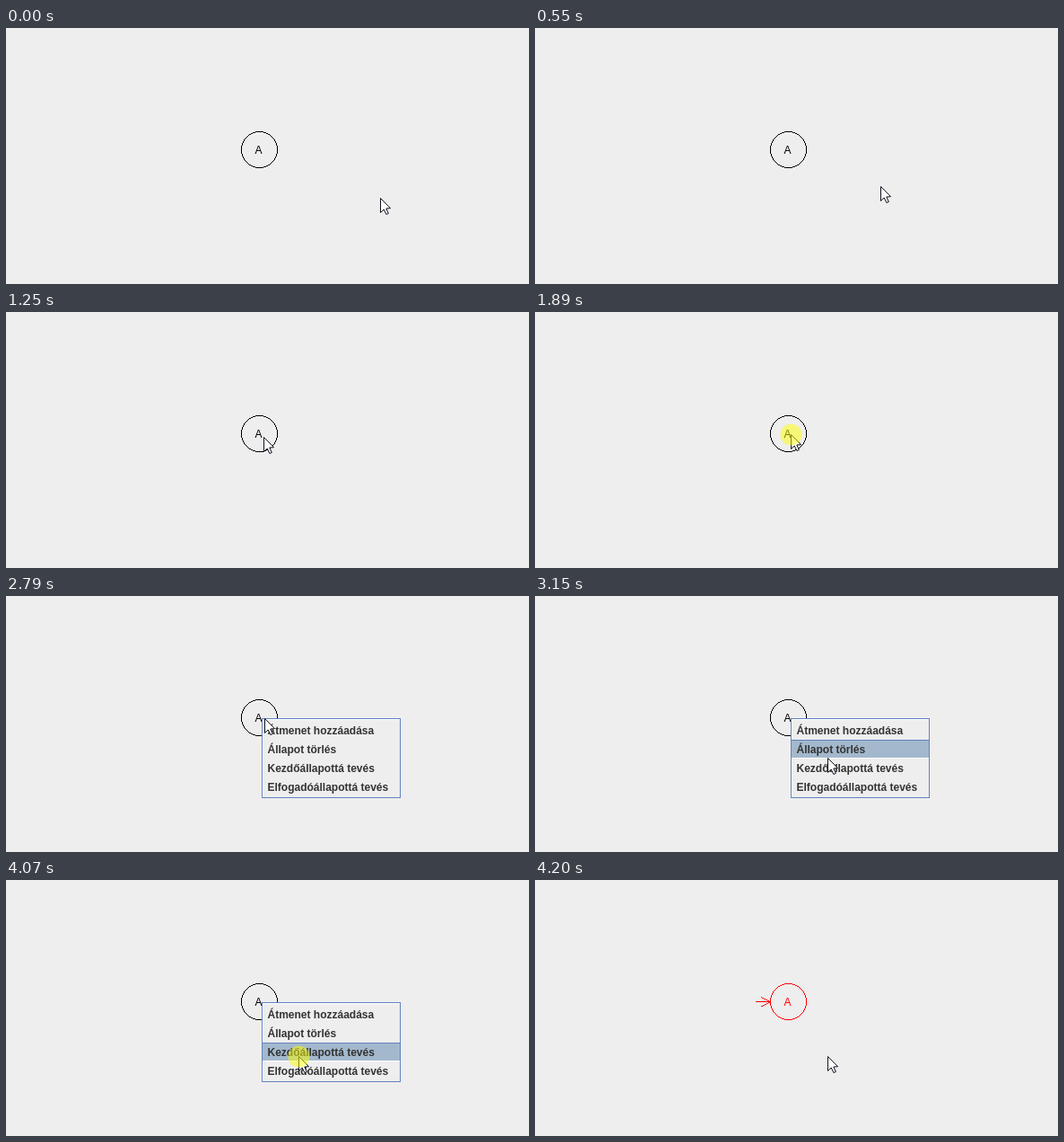
Animation of 583x285 px, one loop 4.9 s. Source, as an HTML page with a canvas:

```html
<!DOCTYPE html>
<html lang="hu">
<head>
<meta charset="utf-8">
<title>Kezdőállapot beállítása</title>
<style>
html, body { margin: 0; width: 100%; height: 100%; overflow: hidden; background: #eee; }
canvas { display: block; }
</style>
</head>
<body>
<canvas id="stage" width="583" height="285"></canvas>
<script>
const ctx = document.getElementById('stage').getContext('2d');
const LOOP = 4900;
const FACE = '"Liberation Sans", Arial, sans-serif';
const MENU = { x: 285, y: 136, w: 155, h: 89, row: 21 };
const ITEMS = ['Átmenet hozzáadása', 'Állapot törlés', 'Kezdőállapottá tevés', 'Elfogadóállapottá tevés'];
const START = [417, 189];

// Pointer moves: start, end, number of steps, waypoints as [step, x, y]
const MOVES = [
  { from: 450, to: 970, steps: 12, path: [[0, 413, 187], [2, 385, 176], [4, 345, 164], [6, 308, 156], [8, 290, 153], [11, 288, 143]] },
  { from: 1050, to: 1380, steps: 7, path: [[0, 288, 142], [6, 285, 136]] },
  { from: 2790, to: 3280, steps: 12, path: [[0, 288, 136], [4, 306, 152], [8, 326, 180], [11, 331, 193]] },
  { from: 3330, to: 3331, steps: 2, path: [[0, 331, 195], [1, 331, 195]] },
  { from: 3560, to: 3890, steps: 5, path: [[0, 331, 196], [4, 326, 196]] }
];

const within = (t, a, b) => t >= a && t < b;

function rect(x, y, w, h, color) {
  ctx.fillStyle = color;
  ctx.fillRect(x, y, w, h);
}

function text(str, x, y, color, weight = '') {
  ctx.font = `${weight} 12px ${FACE}`;
  ctx.fillStyle = color;
  ctx.fillText(str, x, y);
}

// Crisp one-pixel circle and line, without smoothing
function circle(cx, cy, r, color) {
  const n = Math.round(r * Math.SQRT1_2);
  for (let i = -n; i <= n; i++) {
    const j = Math.round(Math.sqrt(r * r - i * i));
    for (const s of [-j, j]) {
      rect(cx + i, cy + s, 1, 1, color);
      rect(cx + s, cy + i, 1, 1, color);
    }
  }
}

function line(x0, y0, x1, y1, color) {
  const n = Math.max(Math.abs(x1 - x0), Math.abs(y1 - y0));
  for (let i = 0; i <= n; i++) {
    rect(Math.round(x0 + (x1 - x0) * i / n), Math.round(y0 + (y1 - y0) * i / n), 1, 1, color);
  }
}

function along(path, k) {
  let i = 0;
  while (i < path.length - 2 && k > path[i + 1][0]) i++;
  const [k0, x0, y0] = path[i];
  const [k1, x1, y1] = path[i + 1];
  const p = (k - k0) / (k1 - k0);
  return [Math.round(x0 + (x1 - x0) * p), Math.round(y0 + (y1 - y0) * p)];
}

function pointerAt(t) {
  const move = MOVES.filter(m => t >= m.from).pop();
  if (!move) return START;
  const last = move.steps - 1;
  const k = Math.min(last, Math.floor((t - move.from) / (move.to - move.from) * last + 0.001));
  return along(move.path, k);
}

function drawState(active) {
  const color = active ? '#f00' : '#000';
  circle(282, 135, 20, color);
  text('A', 277.5, 139.5, color);
  if (active) {
    line(246, 135, 262, 135, color);
    line(252, 130, 262, 135, color);
    line(252, 140, 262, 135, color);
  }
}

function drawMenu(py) {
  const { x, y, w, h, row } = MENU;
  rect(x, y, w, h, '#6382bf');
  rect(x + 1, y + 1, w - 2, h - 2, '#eee');
  rect(x + 1, y + 1, w - 2, 1, '#fff');
  rect(x + 1, y + 1, 1, h - 2, '#fff');
  const hover = Math.floor((py - y - 3) / row);
  ITEMS.forEach((label, i) => {
    const top = y + 3 + i * row;
    if (i === hover) {
      rect(x + 1, top, w - 2, row, '#a3b8cc');
      rect(x + 1, top, w - 2, 1, '#6382bf');
      rect(x + 1, top + row - 1, w - 2, 1, '#fff');
    }
    text(label, 291.5, top + 15, '#333', 'bold');
  });
}

function drawPointer(x, y) {
  ctx.save();
  ctx.translate(x + 0.5, y + 0.5);
  ctx.beginPath();
  ctx.moveTo(0, 0);
  for (const [px, py] of [[0, 16], [3.7, 12.5], [6.4, 18], [8.8, 17], [6.3, 11.5], [11, 11.2]]) ctx.lineTo(px, py);
  ctx.closePath();
  ctx.fillStyle = '#fff';
  ctx.fill();
  ctx.strokeStyle = '#10101c';
  ctx.lineWidth = 1;
  ctx.stroke();
  ctx.restore();
}

function drawClick(x, y) {
  ctx.fillStyle = 'rgba(255, 255, 0, 0.5)';
  ctx.beginPath();
  ctx.arc(x + 0.5, y + 0.5, 12, 0, Math.PI * 2);
  ctx.fill();
}

function draw(t) {
  const [x, y] = pointerAt(t);
  rect(0, 0, 583, 285, '#eee');
  drawState(t >= 4200);
  if (within(t, 1970, 4150)) drawMenu(y);
  drawPointer(x, y);
  if (within(t, 1890, 1970) || within(t, 4070, 4150)) drawClick(x, y);
}

const begin = performance.now();
function tick() {
  draw((performance.now() - begin) % LOOP);
  requestAnimationFrame(tick);
}
tick();
</script>
</body>
</html>
```
